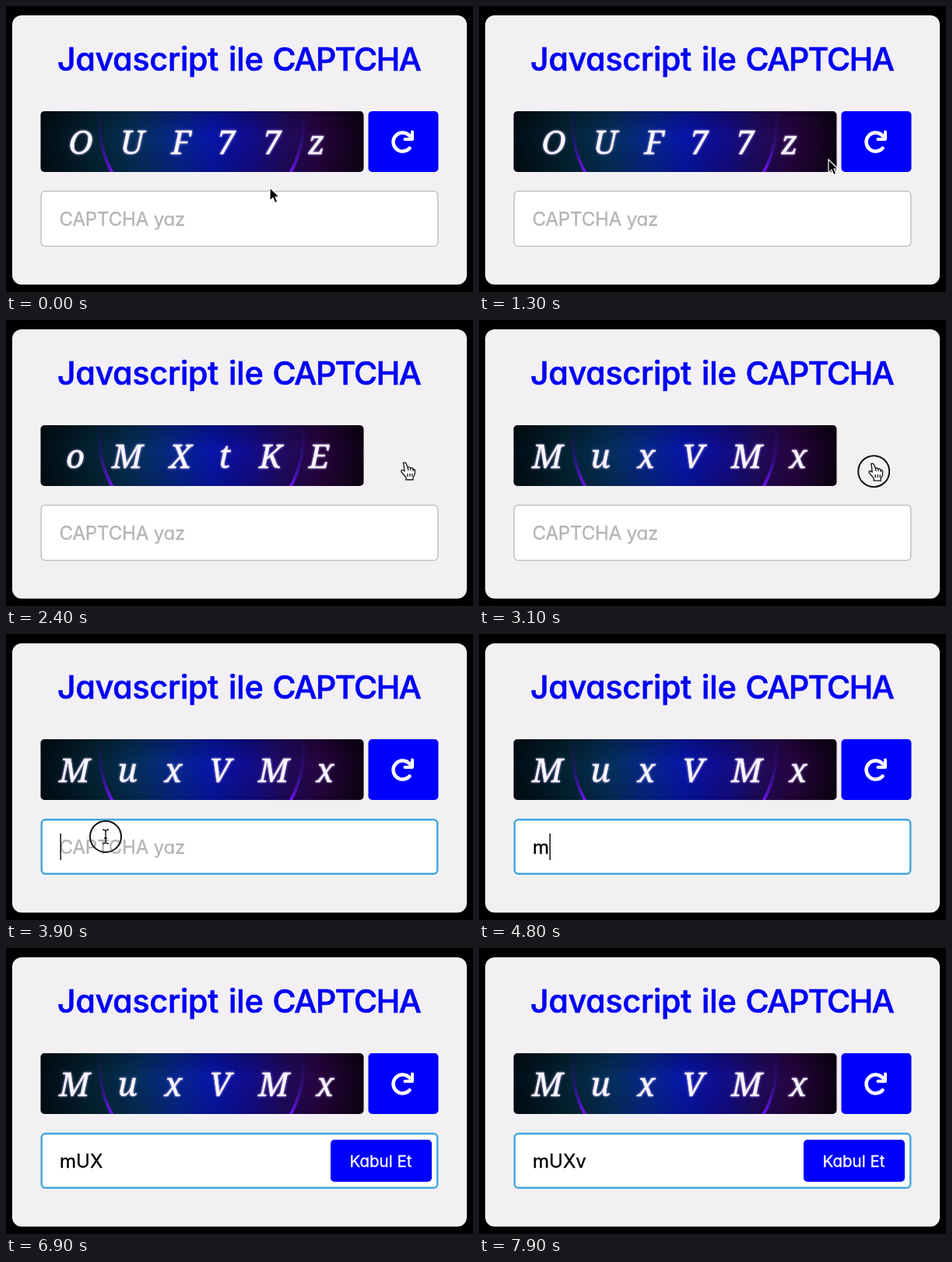
Animation, 600 px wide and 367 px high, one loop 8000 ms. Source, as an HTML page:

```html
<!DOCTYPE html>
<html lang="tr">
<head>
<meta charset="utf-8">
<title>CAPTCHA</title>
<style>
  html, body { margin: 0; width: 100%; height: 100%; overflow: hidden; background: #000; }
  svg { display: block; width: 100vw; height: 100vh; }
  text { font-family: Inter, "Open Sans", sans-serif; font-optical-sizing: none; font-feature-settings: "cv11"; white-space: pre; }
  .title { font-size: 41px; font-weight: 500; fill: #0000f5; stroke: #0000f5; stroke-width: .7; }
  .field { font-size: 24px; stroke-width: .35; }
  .code { font: italic 500 42px "Noto Serif", serif; fill: #fff; stroke: #fff; stroke-width: .4; text-anchor: middle; text-shadow: 0 0 3px #b7a3e8; }
</style>
</head>
<body>
<svg viewBox="0 0 600 367">
  <defs>
    <linearGradient id="night">
      <stop offset="0" stop-color="#020c14"/>
      <stop offset=".17" stop-color="#032434"/>
      <stop offset=".3" stop-color="#052f5c"/>
      <stop offset=".42" stop-color="#06268c"/>
      <stop offset=".53" stop-color="#0715aa"/>
      <stop offset=".65" stop-color="#120c8c"/>
      <stop offset=".75" stop-color="#200a62"/>
      <stop offset=".86" stop-color="#270440"/>
      <stop offset="1" stop-color="#0c0212"/>
    </linearGradient>
    <linearGradient id="shade" x2="0" y2="1">
      <stop offset="0" stop-color="#000" stop-opacity=".25"/>
      <stop offset=".4" stop-color="#000" stop-opacity="0"/>
      <stop offset="1" stop-color="#000" stop-opacity=".15"/>
    </linearGradient>
    <linearGradient id="rim" gradientUnits="userSpaceOnUse" x1="0" y1="135" x2="0" y2="213">
      <stop offset="0" stop-color="#1c0c50" stop-opacity=".3"/>
      <stop offset=".5" stop-color="#2c1488" stop-opacity=".6"/>
      <stop offset="1" stop-color="#6a14e8"/>
    </linearGradient>
    <clipPath id="panel"><rect x="44.500" y="135" width="415" height="78" rx="5"/></clipPath>
  </defs>

  <rect width="600" height="367"/>
  <rect x="8" y="12" width="584" height="345.500" rx="12" fill="#f2f0f3"/>
  <text class="title" y="83"><tspan x="66" letter-spacing="-.15">Javascript</tspan><tspan x="286">ile</tspan><tspan x="342.500" letter-spacing="-1.400">CAPTCHA</tspan></text>

  <g clip-path="url(#panel)">
    <rect x="44" y="135" width="416" height="78" fill="url(#night)"/>
    <rect x="44" y="135" width="416" height="78" fill="url(#shade)"/>
    <circle cx="251" cy="150" r="131" fill="none" stroke="url(#rim)" stroke-width="4"/>
  </g>
  <text class="code" id="code" y="190"></text>

  <g id="reload">
    <rect x="465.500" y="135" width="90" height="78" rx="5" fill="#00f"/>
    <path d="M518.500 182.500A12 12 0 1 1 518.500 166.500" fill="none" stroke="#fff" stroke-width="4.500" stroke-linecap="round"/>
    <path d="M522 161.500V171H512.500" fill="none" stroke="#fff" stroke-width="4" stroke-linecap="round" stroke-linejoin="round"/>
  </g>

  <rect id="box" rx="5" fill="#fff"/>
  <text class="field" id="hint" x="68.500" y="282" fill="#b5b5b5" stroke="#b5b5b5" letter-spacing="-.15">CAPTCHA yaz</text>
  <text class="field" id="typed" x="69" y="282" stroke="#000"></text>
  <rect id="caret" y="256" width="1.400" height="34"/>
  <g id="submit">
    <rect x="417" y="246" width="130" height="54" rx="5" fill="#00f"/>
    <text x="481.500" y="281" font-size="20.500" text-anchor="middle" fill="#fff" stroke="#fff" stroke-width=".3">Kabul Et</text>
  </g>

  <g id="pointer">
    <circle id="ring" r="20" fill="none" stroke="#111" stroke-width="2"/>
    <path id="arrow" d="M0 0V17L4 13.300L6.700 19.500L9.800 18.200L7.200 12.200H12.500Z" stroke="#fff" stroke-width="1.200"/>
    <path id="hand" d="M-3-8C-5-10-1.500-11 0-9L2-4C3-5 5-4 5.500-3C7-4 8.500-3 9-1.500C10.500-2 11.500-1 11.500 1L11 6L9 9V12H0V9L-6 2C-7-1-4-1-2 1Z M2-4L3 0M5.500-3L6 0M9-1.500V1M2 4V8M5 4V8M8 4V8" fill="#fff" stroke="#111" stroke-width="1.300" stroke-linejoin="round"/>
    <path id="beam" d="M-4-9Q0-9 0-6Q0-9 4-9M0-6V6M-4 9Q0 9 0 6Q0 9 4 9M-2 2H2" fill="none" stroke="#111" stroke-width="1.400"/>
  </g>
</svg>
<script>
const LOOP = 8000;
const el = id => document.getElementById(id);
const set = (id, attrs) => {
  for (const name in attrs) el(id).setAttribute(name, attrs[name]);
};
const write = (id, text) => {
  if (el(id).textContent !== text) el(id).textContent = text;
};
const show = (id, on) => el(id).style.display = on ? '' : 'none';
const last = (list, t) => list.filter(item => item[0] <= t).pop();
const clamp = v => Math.min(1, Math.max(0, v));
const ease = v => v * v * (3 - 2 * v);
const fade = (t, start) => ease(clamp((t - start) / 300));

const HOVER = [1500, 3200];
const FOCUS = 3800;
const CLICKS = [2100, 3000, FOCUS];
const codes = [
  [0, 'OUF77z', [96, 162, 225, 283, 342, 399]],
  [2100, 'oMXtKE', [89, 156, 224, 281, 340, 402]],
  [3000, 'MuxVMx', [88, 156, 215, 275, 344, 410]]
];
const typing = [[0, ''], [4800, 'm'], [5700, 'mU'], [6300, 'mUX'], [7300, 'mUXv']];
const path = [
  [0, 339, 233], [800, 339, 233], [1300, 449, 197], [1700, 514, 193],
  [3050, 514, 193], [3700, 128, 260], [LOOP, 128, 260]
];

function position(t) {
  const i = path.findIndex(p => p[0] > t);
  const [t0, x0, y0] = path[i - 1], [t1, x1, y1] = path[i];
  const k = ease((t - t0) / (t1 - t0));
  return [x0 + (x1 - x0) * k, y0 + (y1 - y0) * k];
}

// The border lies inside the field's outer edge, whatever its weight.
function drawBox(color, weight) {
  set('box', {
    x: 44.5 + weight / 2, y: 237 + weight / 2,
    width: 511 - weight, height: 72 - weight,
    stroke: color, 'stroke-width': weight
  });
}

function render(t) {
  const [, code, xs] = last(codes, t);
  set('code', { x: xs.join(' ') });
  write('code', code);
  set('reload', { opacity: 1 - fade(t, HOVER[0]) + fade(t, HOVER[1]) });

  const focused = t >= FOCUS;
  drawBox(focused ? '#43a6dd' : '#b9b9b9', focused ? 2.4 : 1.3);

  const [typedAt, value] = last(typing, t);
  write('typed', value);
  show('hint', !value);
  set('submit', { opacity: fade(t, typing[1][0]) });

  const width = value ? el('typed').getComputedTextLength() : 0;
  set('caret', { x: 69.5 + width });
  show('caret', focused && (t - Math.max(typedAt, FOCUS)) % 1000 < 500);

  const [x, y] = position(t);
  const hovering = t >= HOVER[0] && t < HOVER[1];
  const overField = t > 3000 && y > 237;
  set('pointer', { transform: `translate(${x} ${y})` });
  show('pointer', !value);
  show('hand', hovering);
  show('beam', !hovering && overField);
  show('arrow', !hovering && !overField);
  show('ring', CLICKS.some(c => t >= c && t < c + 220));
}

function tick(now) {
  render(now % LOOP);
  requestAnimationFrame(tick);
}
render(0);
requestAnimationFrame(tick);
</script>
</body>
</html>
```
